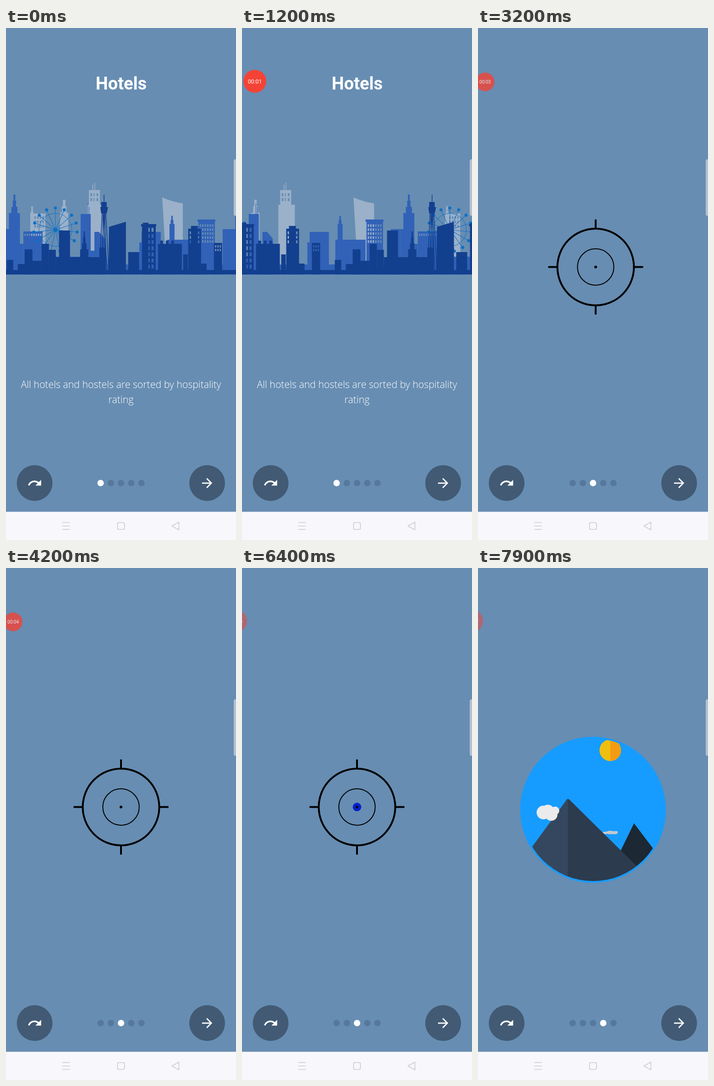
Write an HTML page that moves like this. It is 502x1115 px and loops after 8 s.

```html
<!DOCTYPE html>
<html lang="en">
<head>
<meta charset="utf-8">
<title>Onboarding</title>
<style>
html, body { margin: 0; width: 100%; height: 100%; overflow: hidden; background: #678db2; }
#stage { display: block; width: 100%; height: 100%; }
text { font-family: Roboto, sans-serif; font-size: 22.31px; fill: #fff; text-anchor: middle; }
.head { font-size: 39px; font-weight: 700; }
.hotels .head { font-size: 38px; }
.hotels .body { font-family: "Open Sans", "Noto Sans", sans-serif; font-size: 21.3px; font-weight: 340; }
</style>
</head>
<body>
<svg id="stage" viewBox="0 0 502 1115">
  <rect width="502" height="1115" fill="#678db2"/>

  <svg class="page hotels" width="502" height="1115">
    <text class="head" x="251.5" y="134">Hotels</text>
    <g id="city"></g>
    <text class="body" x="251" y="784">All hotels and hostels are sorted by hospitality</text>
    <text class="body" x="251" y="816.5">rating</text>
  </svg>

  <svg class="page" width="502" height="1115">
    <text class="head" x="251" y="138.5">Banks</text>
    <g fill="none" stroke-linecap="round" stroke-linejoin="round" transform="translate(-3)">
      <g stroke="#9ab1cf" stroke-width="14">
        <circle cx="252" cy="432" r="124"/>
        <path d="M342 522L388 569"/>
      </g>
      <g id="bank" stroke="#fff" stroke-width="2.6"></g>
      <text x="252" y="408" style="font-size:19.5px;font-weight:700;letter-spacing:4.6px">BANK</text>
    </g>
    <text x="251" y="789.5">We carefully verify all banks before add them</text>
    <text x="251" y="816">into the app</text>
  </svg>

  <svg class="page" width="502" height="1115">
    <g transform="translate(251 520.5)" fill="none" stroke="#000" stroke-width="4">
      <circle r="83.5"/>
      <circle r="39.7" stroke-width="2"/>
      <path stroke-linecap="round" d="M0-102V-84M0 84V102M-102 0H-84M84 0H102"/>
      <circle id="bullet" fill="#0420d0" stroke="none"/>
      <circle r="3" fill="#000" stroke="none"/>
    </g>
  </svg>

  <svg class="page" width="502" height="1115">
    <clipPath id="disc"><circle cx="251" cy="526.5" r="155.2"/></clipPath>
    <circle cx="251" cy="526.5" r="159" fill="#169cff"/>
    <g clip-path="url(#disc)">
      <g id="sun">
        <circle r="23.5" fill="#efbf10"/>
        <path d="M0-23.5A23.5 23.5 0 0 1 0 23.5Z" fill="#f39c12"/>
      </g>
      <path d="M340.5 556L402 637V690H275Z" fill="#1c2833"/>
      <g id="smallCloud" fill="#c6c8cb">
        <circle cx="-11" cy="2" r="6.5"/><circle r="9"/><circle cx="9" cy="2" r="7"/><circle cx="11.5" cy="-3" r="4.5"/>
      </g>
      <path d="M196 503Q193 503 191 508L57 690H196Z" fill="#35475e"/>
      <path d="M196 503Q199 503 202 507L388 690H196Z" fill="#2c3b4e"/>
      <g id="bigCloud" fill="#ebebeb">
        <circle cx="-9.5" r="15"/><circle cy="-3" r="14"/><circle cx="16" cy="-4" r="9"/><circle cx="7.5" cy="4.5" r="13.5"/>
      </g>
    </g>
  </svg>

  <path d="M502 286H501Q497 286 497 290V405Q497 409 501 409H502Z" fill="#b5c0cf"/>
  <g fill="#425a74"><circle cx="62.5" cy="991" r="39"/><circle cx="439" cy="991" r="39"/></g>
  <g fill="#fff">
    <path transform="translate(46 974.3) scale(1.394)" d="M18.4 10.6C16.55 8.99 14.15 8 11.5 8c-4.65 0-8.58 3.03-9.96 7.22L3.9 16c1.05-3.19 4.05-5.5 7.6-5.5 1.95 0 3.73.72 5.12 1.88L13 16h9V7l-3.6 3.6z"/>
    <path transform="translate(422.3 974.3) scale(1.394)" d="M12 4l-1.41 1.41L16.17 11H4v2h12.17l-5.58 5.59L12 20l8-8z"/>
  </g>
  <g id="dots"></g>

  <g id="timer">
    <circle r="25" fill="#f44336"/>
    <text id="clock" y="4.5" style="font-size:12.3px"></text>
  </g>

  <rect y="1053.5" width="502" height="62" fill="#f8f7fb"/>
  <g fill="none" stroke="#cbcacf" stroke-width="1.6" stroke-linejoin="round">
    <path d="M122.5 1077h17m-17 7.5h17m-17 7.5h17M377.5 1076v17l-15.5-8.5z"/>
    <rect x="243.5" y="1077" width="15" height="15" rx="3"/>
  </g>
</svg>
<script>
const $ = id => document.getElementById(id);
const place = (el, x, y, sx = 1, sy = sx) =>
  el.setAttribute('transform', `translate(${x} ${y}) scale(${sx} ${sy})`);
const ramp = (t, a, b) => Math.min(1, Math.max(0, (t - a) / (b - a)));
const mix = (a, b, k) => a + (b - a) * k;
const times = (n, f) => Array.from({ length: n }, (_, i) => f(i)).join('');
const path = d => `<path fill-rule="evenodd" d="${d}"/>`;

const ground = 536.6;

// A building from the ground up; its windows are holes spread over its width.
function block(x, w, top, cols = 0, rows = 0) {
  const p = w / (cols + 0.6);
  const holes = times(cols * rows, i =>
    `M${x + (i % cols + 0.5) * p} ${top + (Math.floor(i / cols) * 1.6 + 1) * p}h${p * 0.55}v${p}h${-p * 0.55}z`);
  return path(`M${x} ${ground}V${top}h${w}V${ground}z` + holes);
}
// Stacked tiers, each about half as wide as the one below.
const spire = (x, w, top, tiers, step) => times(tiers, i => {
  const half = w / 2 * 0.55 ** i;
  return block(x - half, half * 2, top - i * step);
});
const cap = (x, y, w) => path(`M${x} ${y}h${w}v5h${-w}z`);

const back =
  block(53, 33, 404, 5, 3) + spire(57, 6, 400, 2, 12) +
  spire(127, 18, 402, 3, 14) +
  block(181, 24, 353, 3, 2) + block(177, 36, 385) + block(188.5, 1.5, 341) + block(193, 1.5, 337) +
  path(`M341 369Q364 379 386 382V${ground}H351Z`);

const mid =
  block(0, 494, 515) + block(52, 150, 498) +
  block(0, 8, 438) + spire(18.5, 24, 403, 4, 13.5) + block(30, 8, 470) + block(38, 42, 443, 8, 1) +
  block(163, 22, 405) + block(178, 1, 382) + block(181, 1, 390) +
  path(`M185 ${ground}V485H193V444H203L215 458L222 515V${ground}Z`) +
  block(291, 8, 467) + block(296, 42, 444) +
  spire(362.5, 11, 427, 3, 9) + block(352, 66, 461) +
  block(420, 36, 422, 6, 5) + cap(418, 417, 39) + block(473, 21, 438);

const wheel = `<g transform="translate(108 439.5)" fill="#0d70c6" stroke="#0d70c6">
  <circle r="36" fill="none"/><circle r="4"/>` +
  times(15, i => `<g transform="rotate(${i * 24})"><path d="M0 0V-44"/><circle cy="-47.5" r="2.9"/></g>`) + '</g>';

const lookout = path('M213.5 363h1.5v16h5v11h3l-3 14h-12l-2-14h2v-11h5.500z') +
  `<path stroke="#133f8f" stroke-width="1.6" fill="none" d="M210 403L204 536M212 403V536M214 403L208 536M214 403L221 536M216 403V536M218 403L225 536"/>`;

const front =
  block(0, 502, 527) + block(2, 14, 505) + block(26, 32, 514) + block(41, 17, 482) + block(58, 20, 507) +
  block(78, 16, 470) + block(94, 15, 483) + block(109, 109, 499) + block(116, 24, 441) +
  spire(171, 18, 482, 4, 13) + lookout + block(204, 14, 478) +
  path(`M224 ${ground}L225 433L262 422V${ground}Z`) + block(267, 24, 488) +
  block(297, 30, 427, 3, 7) + cap(295, 427, 33) + block(299, 12, 424) +
  block(332, 52, 470) + times(3, i => block(337 + i * 12, 6, 463)) +
  block(387, 10, 493) + block(398, 28, 437, 4, 3) + block(404, 15, 431, 1, 0) + block(424, 14, 513) +
  block(454, 18, 468, 3, 2);

const layers = [
  { id: 'back', period: 488, ms: 6000, color: '#9bb0c9', body: back },
  { id: 'mid', period: 494, ms: 4000, color: '#3162b8', body: mid + wheel },
  { id: 'front', period: 502, ms: 2000, color: '#133f8f', body: front },
];
$('city').innerHTML = layers.map(({ id, period, color, body }) =>
  `<g id="${id}" fill="${color}"><g id="${id}Tile">${body}</g><use href="#${id}Tile" x="${period}"/></g>`).join('');

const rect = (x, y, w, h, r = 1) => `<rect x="${x}" y="${y}" width="${w}" height="${h}" rx="${r}"/>`;
const slab = (cx, w, y, h) => rect(cx - w / 2, y, w, h);
$('bank').innerHTML =
  '<path d="M218 371A33.6 33.6 0 0 1 283 371M172 494.5H327M224 506h13m15 0h27M236 517h17"/>' +
  slab(250, 73, 371, 7) + slab(250, 105, 379, 8) + slab(250, 96, 388, 25) + slab(250, 142, 414, 8) +
  slab(250, 107, 483, 5) + slab(250, 119, 488, 6) +
  times(3, i => {
    const x = 217.5 + i * 32;
    return slab(x, 21, 424, 4) + slab(x, 13, 428, 49) + slab(x, 21, 477, 5);
  }) +
  times(2, i => rect(193 + i * 105, 449, 8.5, 19, 4) +
    `<path d="M${193 + i * 105} 441.5h9M${183.5 + i * 132} 422V494"/>`);

$('dots').innerHTML = times(5, i => `<circle cx="${206.5 + i * 22.3}" cy="991" r="7"/>`);

const pages = document.querySelectorAll('.page'), dots = [...$('dots').children];
const turns = [1466, 2985, 6594];

function draw(t) {
  const scroll = turns.reduce((s, a) => s + 1 - (1 - ramp(t, a, a + 366)) ** 5, 0) * 502;
  const current = turns.filter(a => t >= a).length;
  pages.forEach((p, i) => p.setAttribute('x', i * 502 - scroll));
  dots.forEach((d, i) => d.setAttribute('fill', i === current ? '#fff' : '#56789c'));

  for (const { id, period, ms } of layers) place($(id), -period * (t / ms % 1), 0);

  $('bullet').setAttribute('r', 9.3 * ramp(t, 4400, 5150));

  const k = (t - 6800) / 1100;
  place($('sun'), 288.7, mix(433, 397, k));
  place($('bigCloud'), mix(227.5, 152.5, k), 532.5);
  place($('smallCloud'), mix(325.5, 289, k), 576, 1, mix(1, 0.42, k));

  const shrink = ramp(t, 2500, 2700), dock = ramp(t, 4700, 5150);
  const pose = (start, small, docked) => mix(mix(start, small, shrink), docked, dock);
  place($('timer'), pose(28, 15.5, -13.6), pose(116, 117.3, 115.5), pose(1, 0.815, 0.985));
  $('timer').setAttribute('opacity', t < 200 ? 0 : pose(1, 0.8, 0.5));
  $('clock').textContent = '00:0' + Math.max(0, Math.floor((t - 200) / 1000));
}

function tick() {
  draw(performance.now() % 8000);
  requestAnimationFrame(tick);
}
tick();
</script>
</body>
</html>
```
